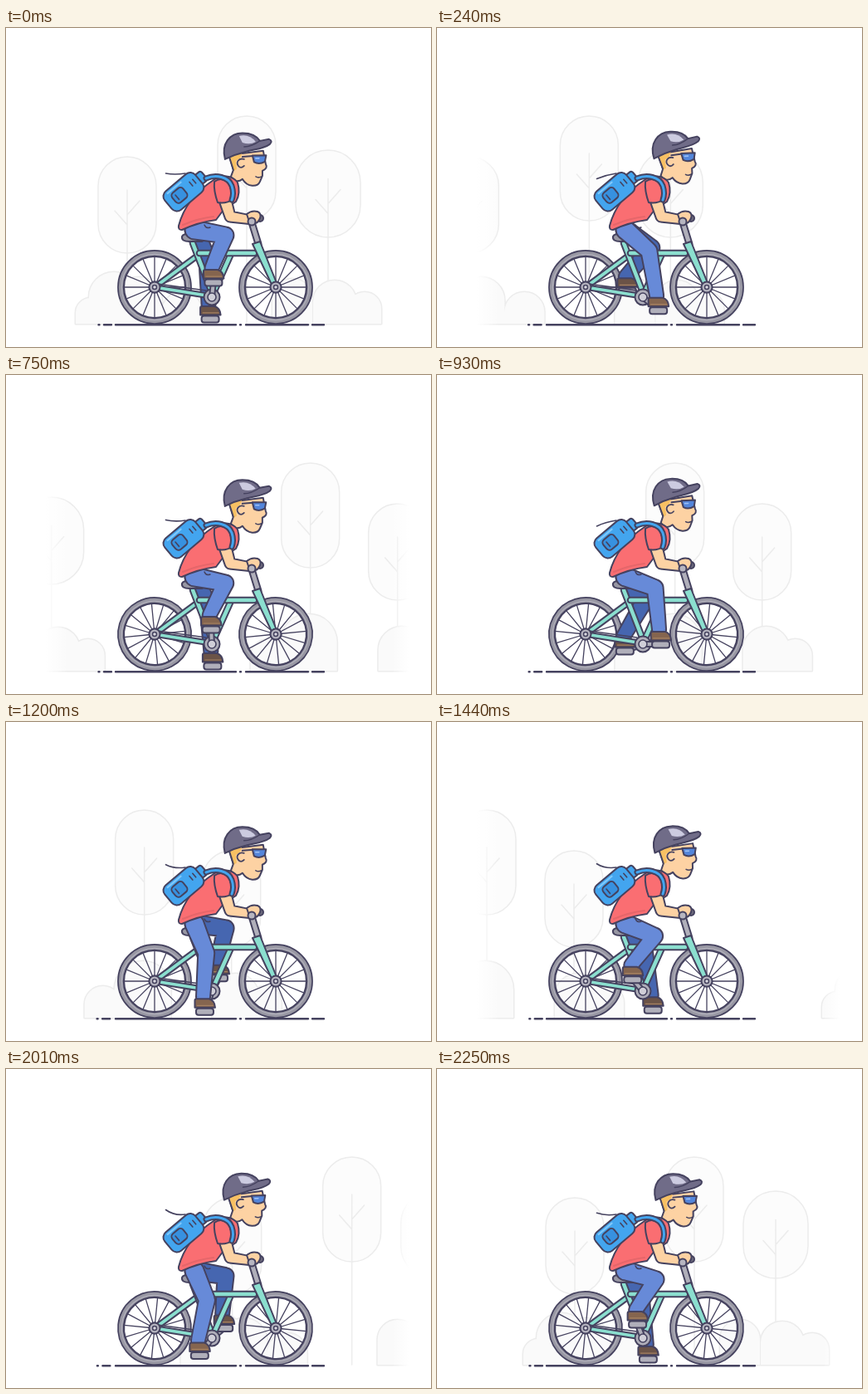
Write an HTML page with a canvas that moves like this. It is 512 by 384 pixels and loops after 2280 ms.

```html
<!DOCTYPE html>
<html lang="en">
<head>
<meta charset="utf-8">
<title>Cyclist</title>
<style>
  html, body { margin: 0; width: 100%; height: 100%; overflow: hidden; background: #fff; }
  canvas { display: block; width: 512px; height: 384px; }
</style>
</head>
<body>
<canvas id="stage" width="512" height="384"></canvas>
<script>
const ctx = document.getElementById('stage').getContext('2d');
const LOOP = 2280, STEP = 30, TURN = Math.PI * 2, DEG = Math.PI / 180;
const INK = '#45425f', GREY = '#9897a3', TEAL = '#8bdfcf', SKIN = '#fdd2a3',
      RED = '#fa6e72', BLUE = '#43a5ef', JEANS = '#678ad8', FAR_JEANS = '#4666b0',
      SHOE = '#85654f', FAR_SHOE = '#6b5347', CAP = '#706c88';
const FAINT = '#ececec', FAINT_FILL = '#fcfcfc';
ctx.lineCap = ctx.lineJoin = 'round';

function shape(path, fill, stroke = INK, width = 2) {
  const p = typeof path === 'string' ? new Path2D(path) : path;
  if (fill) { ctx.fillStyle = fill; ctx.fill(p); }
  if (stroke) { ctx.strokeStyle = stroke; ctx.lineWidth = width; ctx.stroke(p); }
}

function box(x, y, w, h, r, fill, stroke, width) {
  const p = new Path2D();
  p.roundRect(x, y, w, h, r);
  shape(p, fill, stroke, width);
}

function disc(x, y, r, fill, stroke, width) {
  const p = new Path2D();
  p.arc(x, y, r, 0, TURN);
  shape(p, fill, stroke, width);
}

// A line of the given colour with a dark edge on both sides
function tube(path, color, width) {
  shape(path, null, INK, width);
  shape(path, null, color, width - 4);
}

function within(x, y, angle, draw) {
  ctx.save();
  ctx.translate(x, y);
  ctx.rotate(angle);
  draw();
  ctx.restore();
}

// ---------- scenery ----------
const CROWNS = {
  long:  { w: 70, top: 155, h: 116 },
  tall:  { w: 70, top: 106, h: 126 },
  round: { w: 78, top: 147, h: 105 }
};
const TREES = [[146, 'long'], [290, 'tall'], [388, 'round'], [700, 'tall'], [805, 'long']];
// Bush lumps: centre, top, radius
const LUMPS = [[102, 325, 18], [130, 294, 30], [160, 300, 28], [212, 318, 24],
  [345, 302, 24], [396, 304, 26], [432, 318, 20], [650, 318, 22], [698, 288, 34],
  [810, 303, 28], [845, 318, 20]];
const SCENE_WIDTH = 1020, SCENE_SPEED = 4 / 9;

function tree(x, kind) {
  const { w, top, h } = CROWNS[kind], mid = top + h / 2;
  box(x - w / 2, top, w, h, w / 2, FAINT_FILL, FAINT, 1.5);
  shape(`M${x} ${mid - 18}V356M${x} ${mid + 24}l-15 -17M${x} ${mid + 12}l15 -17`, null, FAINT, 1.5);
}

function scenery(t) {
  const place = x => (x - t * SCENE_SPEED + 200 + SCENE_WIDTH) % SCENE_WIDTH - 200;
  for (const [x, kind] of TREES) tree(place(x), kind);
  const bushes = new Path2D();
  for (const [x, top, r] of LUMPS)
    bushes.roundRect(place(x) - r, top, 2 * r, 356 - top, [r, r, 0, 0]);
  shape(bushes, null, FAINT, 3);
  shape(bushes, '#fafafa', null);
  const fade = ctx.createLinearGradient(0, 0, 512, 0);
  [[0, 1], [48, 1], [75, 0], [465, 0], [485, 1], [512, 1]].forEach(([x, a]) =>
    fade.addColorStop(x / 512, `rgba(255,255,255,${a})`));
  ctx.fillStyle = fade;
  ctx.fillRect(0, 0, 512, 384);
}

function ground(t) {
  const d = Math.cos(TURN * t / 760);
  shape(`M${110.5 + d} 357.2h1M${117 + d} 357.2h9M132 357.2H277M282 357.2h1M289 357.2H364M369 357.2H383`,
    null, INK, 2.4);
}

// ---------- bike ----------
function hub(x, y) {
  disc(x, y, 6.5, '#b6b5c0');
  disc(x, y, 2.5, '#d8d7df', INK, 1.5);
}

function wheel(x, angle) {
  within(x, 312, angle, () => {
    for (let i = 0; i < 16; i++) {
      const a = TURN * i / 16;
      shape(`M0 0L${37 * Math.cos(a)} ${37 * Math.sin(a)}`, null, INK, 1.3);
    }
    disc(0, 0, 40.4, null, INK, 9);
    disc(0, 0, 40.7, null, GREY, 5);
    disc(0, 0, 39.7, null, '#b0afba', 1.2);
  });
  hub(x, 312);
}

function frame() {
  tube('M179 312L248 323', TEAL, 7.5);
  tube('M179 312L228 276', TEAL, 8);
  tube('M225 259L249 321', TEAL, 8.5);
  tube('M249 321L271 272', TEAL, 8.5);
  tube('M233 271H299', TEAL, 8.5);
  shape('M183 308L241 316', null, INK, 1.3);
  tube('M296 234L304 260', '#b0afba', 9);
  shape('M297 260L306 257L328 312L322 313Z', TEAL);
  hub(325, 312);
  hub(179, 312);
  shape('M212 251Q214 247 222 248L238 250Q242 255 236 257L221 257Q211 257 212 251Z', GREY);
}

function pedalAt(angle) {
  return [248 + 22 * Math.sin(angle), 328 - 22 * Math.cos(angle)];
}

function crank(angle) {
  const [x, y] = pedalAt(angle);
  tube(`M248 324L${x} ${y}`, '#b0afba', 8);
  box(x - 10.5, y - 3.5, 21, 8, 3, '#b0afba');
}

// ---------- rider ----------
// A tapering limb through [x, y, radius] joints, outlined as one shape
function limb(joints, fill) {
  const p = new Path2D();
  joints.forEach(([x, y, r], i) => {
    p.moveTo(x + r, y);
    p.arc(x, y, r, 0, TURN);
    const next = joints[i + 1];
    if (!next) return;
    const [u, v, s] = next, a = Math.atan2(v - y, u - x) + Math.PI / 2;
    const c = Math.cos(a), n = Math.sin(a);
    p.moveTo(x + r * c, y + r * n);
    p.lineTo(x - r * c, y - r * n);
    p.lineTo(u - s * c, v - s * n);
    p.lineTo(u + s * c, v + s * n);
    p.closePath();
  });
  shape(p, null, INK, 4);
  shape(p, fill, null);
}

// The thigh swings once per crank turn; the shin spans knee to pedal
function leg(angle, jeans, shoe) {
  const [px, py] = pedalAt(angle);
  const swing = (38 - 30 * Math.cos(angle - 25 * DEG)) * DEG;
  const knee = [227 + 38 * Math.cos(swing), 243 + 38 * Math.sin(swing)];
  limb([[227, 243, 10.5], [...knee, 9], [px - 2, py - 17, 7.5]], jeans);
  shape(`M${px - 12} ${py - 13}Q${px - 12} ${py - 15} ${px - 10} ${py - 15}H${px + 5}
    Q${px + 12} ${py - 13} ${px + 12.5} ${py - 4.5}H${px - 12}Z`, shoe);
  shape(`M${px - 9} ${py - 7}H${px + 10}`, null, '#a58162', 1.2);
}

function strap(t) {
  const y = 175 + 7 * Math.sin(TURN * t / 760);
  shape(`M192.5 ${y}Q203 177 216 175`, null, INK, 1.6);
}

function backpack() {
  within(215, 197, -40 * DEG, () => {
    box(20, -7, 11, 14, 3, BLUE);
    box(-25, -15, 48, 29, 8, BLUE);
    shape('M-17 -11.5H4', null, '#7fc8fb', 2);
    box(-16, -8, 17, 15, 4.5, '#3791e0');
    shape('M-11 -4v7M12 -5v6M17 -5v6', null, INK, 1.6);
  });
}

function torso() {
  shape(`M250 183C258 176 273 177 279 186Q283 199 277 209L262 219Q256 227 253 231
    Q231 234 212 243Q207 243 208 238C214 215 227 198 250 183Z`, RED);
  shape('M213 237Q232 229 250 227', null, '#e5666a', 2);
  shape('M239 237q2 5 7 3', null, INK, 1.5);
}

function arm() {
  limb([[264, 207, 6.5], [270, 227, 5.5], [296, 231, 4.2]], SKIN);
  disc(306, 229, 4, '#6c6a7c');
  shape('M290 224Q296 219 303 221Q308 223 306 229Q303 236 298 235L293 233Z', SKIN);
  disc(296, 233, 4.5, '#b6b5c0');
  shape('M251 185Q260 178 269 187L274 206Q265 212 255 210Q250 196 251 185Z', RED);
  tube('M241 181C253 176 268 179 272 190Q275 199 272 207', BLUE, 7);
}

function head(t) {
  const back = (1 - Math.cos(TURN * (t - 25) / 380)) / 2;
  within(286 - back, 190 - 2 * back, -3 * back * DEG, () => {
    ctx.translate(-285, -190);
    shape(`M268 153L273 171L270 179Q276 188 284 182C290 192 302 192 305 185L308 178L308 172
      Q315 169 312 164L309 148Z`, SKIN);
    shape('M268 155L284 150L281 157L276 160L277 170L273 172Z', '#f7c063', null);
    shape('M268 155L273 171', null);
    shape('M286 158C279 156 276 162 279 166Q282 170 286 166', SKIN, INK, 1.8);
    shape('M300 179Q303 181 307 179', null, INK, 1.5);
    shape('M284 155L297 154', null);
    shape('M296 153.5H312.5L311 161Q304 165 298 161.5Z', '#5385da');
    shape('M300 157h4', null, '#9cc0f5', 1.6);
    shape(`M263 158C258 139 269 126.5 284 126.5C295 126.5 302 131 305 136L316 134
      Q321 136 317 140C309 146 298 146 288 149Q275 152 263 158Z`, CAP);
    shape('M280 130Q292 127 300 137Q293 141 284 138Z', '#cccbe0', null);
    shape('M305 136Q295 143 286 143', null, INK, 1.5);
  });
}

function draw(t) {
  const pedal = (5 + .469 * t - 6 * Math.sin(TURN * t / 380)) * DEG;
  const roll = TURN * 3.5625 * t / LOOP;
  ctx.fillStyle = '#fff';
  ctx.fillRect(0, 0, 512, 384);
  scenery(t);
  ground(t);
  wheel(179, roll);
  wheel(325, roll);
  crank(pedal + Math.PI);
  leg(pedal + Math.PI, FAR_JEANS, FAR_SHOE);
  frame();
  disc(248, 324, 9.5, '#b0afba');
  crank(pedal);
  disc(248, 324, 5, '#d0cfd8', INK, 1.6);
  leg(pedal, JEANS, SHOE);
  strap(t);
  head(t);
  torso();
  backpack();
  arm();
}

function tick(now) {
  draw(Math.floor(now % LOOP / STEP) * STEP);
  requestAnimationFrame(tick);
}
requestAnimationFrame(tick);
</script>
</body>
</html>
```
